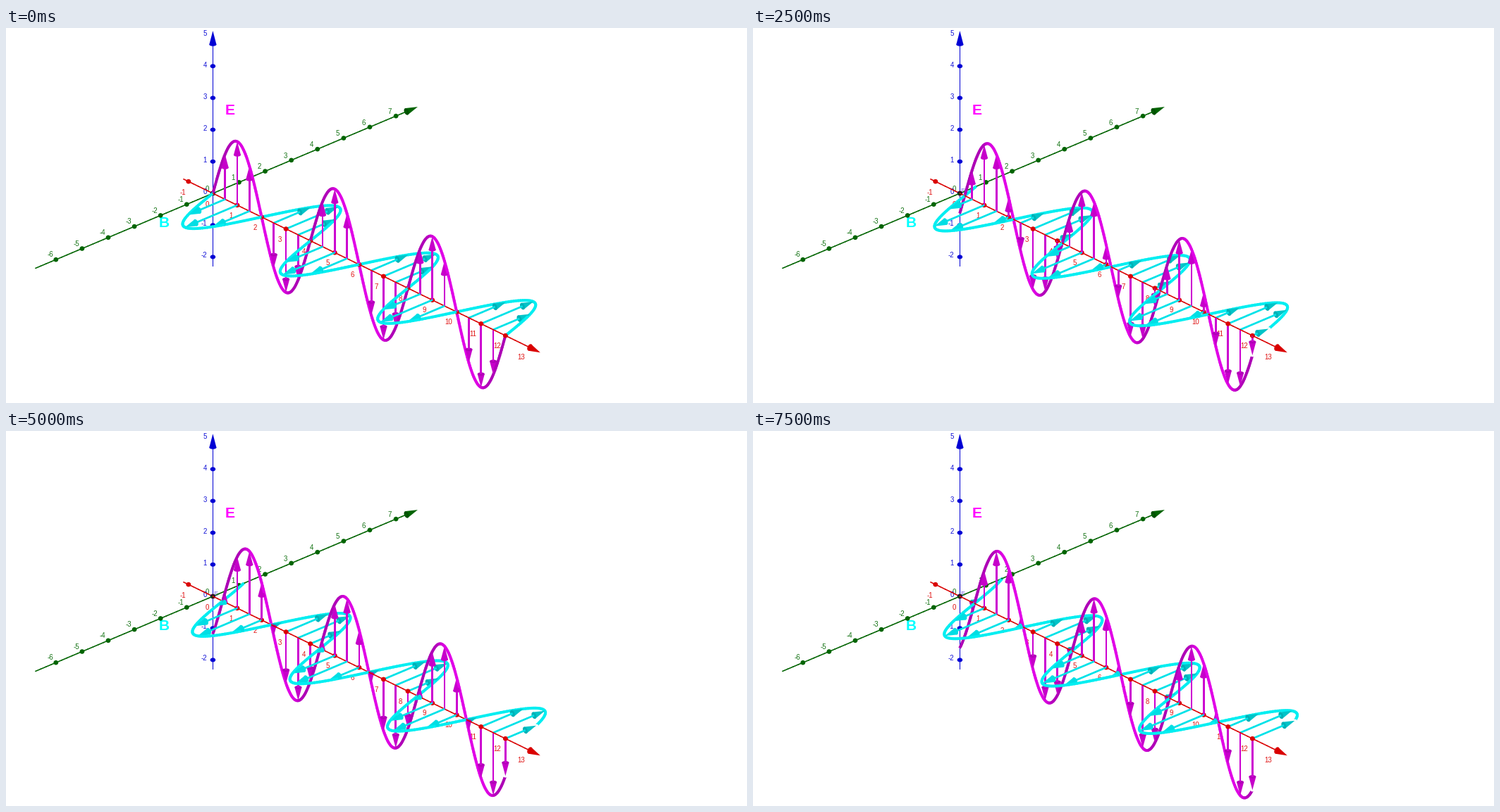
A matplotlib script for the animation above (8 s loop, 1051 px wide and 533 px high).

```python
import numpy as np
import matplotlib.pyplot as plt
from matplotlib.animation import FuncAnimation
from matplotlib.collections import PolyCollection

W, H, DPI = 1051, 533, 100
FRAMES, INTERVAL = 16, 500
SHIFT = 0.04          # wave travel per frame, in axis units
AMP, END = 2.0, 12.0

ORIGIN = np.array([293.4, 235.0])
PROJ = np.array([[34.58, 16.85], [37.1, -15.7], [0.0, -45.2]])
TOWARD = np.array([0.652, -0.608, 0.454])   # direction to the viewer
X, Y, Z = np.eye(3)
RING = np.linspace(0, 2 * np.pi, 25)[:-1]


def rgb(r, g, b):
    return (r / 255, g / 255, b / 255)


RED, GREEN, BLUE = rgb(218, 0, 0), rgb(0, 100, 0), rgb(0, 0, 212)
MAGENTA, CYAN = rgb(204, 0, 208), rgb(0, 226, 232)
WHITE = (1, 1, 1)


def screen(p):
    return ORIGIN + np.asarray(p) @ PROJ


def darker(color, k):
    return tuple(c * k for c in color)


class Scene:
    """Collects flat polygons and sorts them from back to front."""

    def __init__(self):
        self.items = []

    def add(self, poly, color, depth):
        self.items.append((depth, len(self.items), poly, color))

    def stroke(self, points, width, color, bias=0.0, lap=0.6):
        points = np.asarray(points)
        flat = screen(points)
        for i in range(len(points) - 1):
            a, b = flat[i], flat[i + 1]
            d = b - a
            length = np.hypot(*d)
            if length < 1e-6:
                continue
            d = d / length
            n = np.array([-d[1], d[0]]) * width / 2
            a, b = a - d * lap, b + d * lap
            shade = color(d) if callable(color) else color
            depth = (points[i] + points[i + 1]) @ TOWARD / 2 + bias
            self.add([a + n, b + n, b - n, a - n], shade, depth)

    def dot(self, p, rx, ry, color, bias=0.0):
        ring = np.column_stack([rx * np.cos(RING), ry * np.sin(RING)])
        self.add(screen(p) + ring, color, np.dot(p, TOWARD) + bias)

    def cone(self, tip, axis, length, radius, side, base):
        axis = np.asarray(axis)
        e1, e2 = [e for e in (X, Y, Z) if abs(e @ axis) < 0.5]
        center = tip - axis * length
        ring = screen(center + radius * (np.outer(np.cos(RING), e1)
                                         + np.outer(np.sin(RING), e2)))
        t, c = screen(tip), screen(center)
        d = (t - c) / max(np.hypot(*(t - c)), 1e-6)
        across = (ring - c) @ np.array([-d[1], d[0]])
        tri = [ring[across.argmax()], t, ring[across.argmin()]]
        depth = (tip + center) @ TOWARD / 2 + 0.03
        if axis @ TOWARD > 0:
            self.add(ring, side, depth)
            self.add(tri, side, depth)
        else:
            self.add(tri, side, depth)
            self.add(ring, base, depth)

    def sorted(self):
        items = sorted(self.items, key=lambda it: it[:2])
        return [it[2] for it in items], [it[3] for it in items]


def add_axis(scene, unit, lo, hi, ticks, color, dot, head=0.43):
    s = np.append(np.arange(lo, hi - head, 0.2), hi - head)
    scene.stroke(np.outer(s, unit), 1.6, color, -0.02)
    for k in ticks:
        scene.dot(k * unit, *dot, color, -0.01)
    scene.cone(hi * unit, unit, head, 0.1, color, darker(color, 0.8))


def magenta_tube(d):
    k = 0.5 + 0.5 * d[1]
    return rgb(172 + 54 * k, 0, 180 + 52 * k)


def cyan_tube(d):
    return rgb(0, 238, 241)


def add_vector(scene, foot, unit, value, color, side, base):
    size = abs(value)
    if size < 0.02:
        return
    axis = unit * np.sign(value)
    head = min(0.42, size)
    tip = foot + axis * size
    if size > head:
        s = np.linspace(0, size - head, 7)
        scene.stroke(foot + np.outer(s, axis), 2.7, color, lap=0.3)
    scene.cone(tip, axis, head, 0.1 * head / 0.42, side, base)


def build(n):
    scene = Scene()
    add_axis(scene, X, -1.2, 13.43, range(-1, 13), RED, (3.5, 3.3))
    add_axis(scene, Y, -6.78, 7.83, range(-6, 8), GREEN, (3.4, 3.3))
    add_axis(scene, Z, -2.28, 5.11, range(-2, 5), BLUE, (3.8, 3.0))
    scene.dot(np.zeros(3), 3.2, 3.2, rgb(50, 20, 30))

    def wave(x):
        return AMP * np.sin(np.pi / 2 * (x - SHIFT * n))

    x = np.linspace(0, END, 361)
    along = np.outer(x, X)
    scene.stroke(along + np.outer(wave(x), Z), 4.0, magenta_tube)
    scene.stroke(along - np.outer(wave(x), Y), 4.0, cyan_tube)

    for k in np.arange(0.5, END + 0.1, 0.5):
        v = wave(k)
        add_vector(scene, k * X, Z, v, MAGENTA, rgb(198, 0, 202), rgb(176, 0, 182))
        side = rgb(0, 222, 228) if v > 0 else rgb(0, 196, 200)
        add_vector(scene, k * X, Y, -v, CYAN, side, rgb(0, 176, 182))

    if n:
        v = wave(END)
        scene.dot(END * X + v * Z, 3.0, 2.2, WHITE, 0.12)
        scene.dot(END * X - v * Y, 3.0, 2.2, WHITE, 0.12)
    return scene.sorted()


fig = plt.figure(figsize=(W / DPI, H / DPI), dpi=DPI, facecolor="white")
ax = fig.add_axes([0, 0, 1, 1])
ax.set_xlim(0, W)
ax.set_ylim(H, 0)
ax.axis("off")


def label(x, y, text, color, px=9.8, ha="center", weight="normal"):
    return ax.text(x, y + 0.36 * px, text, color=color, fontsize=px * 72 / DPI,
                   ha=ha, va="baseline", family="Liberation Sans",
                   weight=weight, zorder=1)


for k in range(-1, 14):
    label(285 + 34.3 * k, 250 + 16.75 * k, str(k), rgb(224, 20, 20))
for k in range(-6, 8):
    label(285 + 37.07 * k, 228 - 15.65 * k, str(k), rgb(20, 115, 20))
for k in range(-2, 6):
    label(285, 232 - 45 * k, str(k), rgb(20, 20, 215), ha="right")
label(317.3, 115, "E", rgb(255, 0, 255), 21, weight="bold")
label(223.7, 275, "B", rgb(0, 255, 255), 21, weight="bold")
mark = label(297.5, 231, "E", rgb(130, 110, 230), 9)

shapes = PolyCollection([], linewidths=0, zorder=2)
ax.add_collection(shapes, autolim=False)


def update(n):
    polys, colors = build(n)
    shapes.set_verts(polys)
    shapes.set_facecolor(colors)
    mark.set_visible(n > 0)
    return shapes, mark


anim = FuncAnimation(fig, update, frames=FRAMES, interval=INTERVAL,
                     init_func=lambda: update(0), repeat=True, repeat_delay=0)
plt.show()
```
